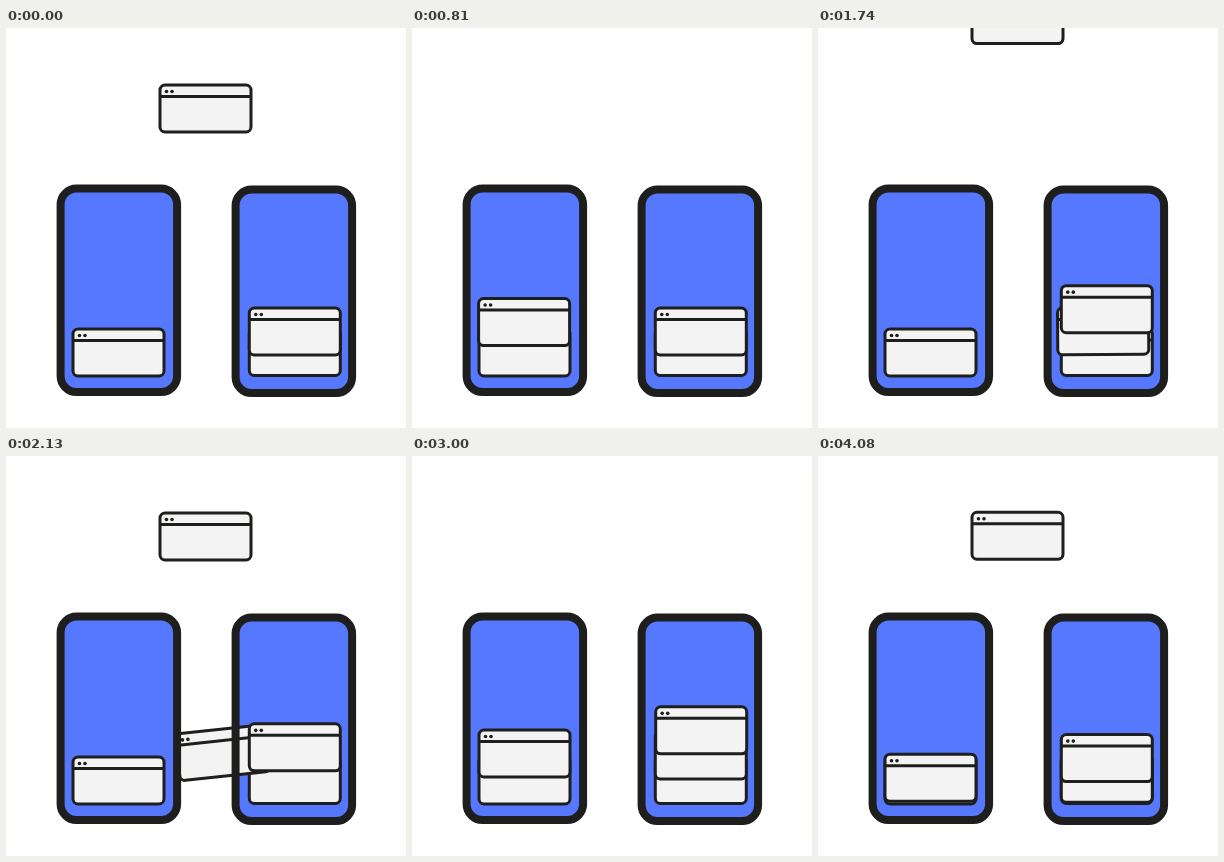
An HTML page with a canvas for the animation above (4.11 s loop, 400 by 400 pixels).

```html
<!DOCTYPE html>
<html lang="en">
<head>
<meta charset="utf-8">
<title>Window exchange</title>
<style>
  html, body { margin: 0; width: 100%; height: 100%; overflow: hidden; background: #fff; }
  canvas { display: block; width: 400px; height: 400px; }
</style>
</head>
<body>
<canvas id="stage" width="400" height="400"></canvas>
<script>
const ctx = document.getElementById('stage').getContext('2d');
const LOOP = 4110;
const INK = '#1e1e1c', PAPER = '#f3f3f3', BLUE = '#5578ff';
const WIN_W = 91, WIN_H = 47;
const TOP = { x: 154, y: 57 };
const LEFT_X = 67, RIGHT_X = 243.3;
const LEFT_BASE = 301, RIGHT_BASE = 300.5, RIGHT_SECOND = 280;

const lerp = (a, b, p) => a + (b - a) * p;
const progress = (t, start, end) => Math.min(1, Math.max(0, (t - start) / (end - start)));
const bezier = (s, a, b) => 3 * s * (1 - s) ** 2 * a + 3 * s * s * (1 - s) * b + s ** 3;
const easeInOut = p => (1 - Math.cos(Math.PI * p)) / 2;
const easeOut = p => 1 - (1 - p) ** 2;

// Fast start with a long, soft landing.
function glide(p) {
  let lo = 0, hi = 1;
  for (let i = 0; i < 24; i++) {
    const mid = (lo + hi) / 2;
    if (bezier(mid, 0.3, 0.25) < p) lo = mid; else hi = mid;
  }
  return bezier(lo, 0, 1);
}

function roundRect(x, y, w, h, r) {
  ctx.beginPath();
  ctx.roundRect(x, y, w, h, r);
}

function drawWindow({ x, y, tilt = 0 }) {
  ctx.save();
  ctx.translate(x + WIN_W / 2, y + WIN_H / 2);
  ctx.rotate(tilt * Math.PI / 180);
  ctx.translate(-WIN_W / 2, -WIN_H / 2);
  ctx.lineWidth = 3;
  ctx.strokeStyle = INK;
  ctx.fillStyle = PAPER;
  roundRect(0, 0, WIN_W, WIN_H, 5);
  ctx.fill();
  ctx.stroke();
  ctx.beginPath();
  ctx.moveTo(0, 11.5);
  ctx.lineTo(WIN_W, 11.5);
  ctx.stroke();
  ctx.fillStyle = INK;
  for (const dotX of [6.5, 12]) {
    ctx.beginPath();
    ctx.arc(dotX, 6.5, 1.8, 0, Math.PI * 2);
    ctx.fill();
  }
  ctx.restore();
}

function phonePath(x, y) {
  roundRect(x, y, 116.5, 203.5, 16);
}

function eachPhone(paint) {
  for (const [x, y] of [[54.6, 160.6], [229.6, 161.6]]) {
    phonePath(x, y);
    paint();
  }
}

function enter(t, start) {
  return { x: TOP.x, y: lerp(-51, TOP.y, easeInOut(progress(t, start, start + 540))) };
}

function fall(t, start, x, y) {
  const p = glide(progress(t, start, start + 960));
  return { x: lerp(TOP.x, x, bezier(p, 0.8, 1.1)), y: lerp(TOP.y, y, p) };
}

function slide(p, from, to, lift, tilt) {
  const arc = Math.sin(Math.PI * p);
  return {
    x: lerp(from.x, to.x, p),
    y: lerp(from.y, to.y, p) - lift * arc,
    tilt: tilt * arc
  };
}

// Drops into the left phone, crosses over and lands on the right stack.
function firstWindow(t, sink) {
  if (t < 1050) return fall(t, 0, LEFT_X, 274);
  if (t < 1630) {
    return slide(progress(t, 1050, 1630), { x: LEFT_X, y: 274 }, { x: RIGHT_X, y: 254 }, 4, 5.7);
  }
  const settled = lerp(254, 276, easeOut(progress(t, 1630, 2910)));
  return { x: RIGHT_X, y: lerp(settled, RIGHT_BASE, sink) };
}

// Leaves the right stack and returns to the left phone.
function returningWindow(t, sink) {
  const pose = slide(progress(t, 1720, 2730),
    { x: RIGHT_X, y: RIGHT_SECOND }, { x: LEFT_X, y: 274 }, 4.6, -6.4);
  pose.y = lerp(pose.y, LEFT_BASE, sink * sink);
  return pose;
}

function secondWindow(t, sink) {
  if (t < 2190) return enter(t, 1590);
  const pose = fall(t, 2190, RIGHT_X, 254);
  pose.y = lerp(pose.y, RIGHT_SECOND, sink);
  return pose;
}

function draw(t) {
  const sink = progress(t, 3570, LOOP);
  ctx.fillStyle = '#fff';
  ctx.fillRect(0, 0, 400, 400);

  ctx.fillStyle = BLUE;
  eachPhone(() => ctx.fill());

  drawWindow({ x: LEFT_X, y: LEFT_BASE });
  drawWindow({ x: RIGHT_X, y: RIGHT_BASE });
  drawWindow(returningWindow(t, sink));
  drawWindow(firstWindow(t, sink));
  drawWindow(secondWindow(t, sink));
  drawWindow(enter(t, 3570));

  ctx.strokeStyle = INK;
  ctx.lineWidth = 8;
  eachPhone(() => ctx.stroke());
}

const startTime = performance.now();
function tick() {
  draw((performance.now() - startTime) % LOOP);
  requestAnimationFrame(tick);
}
tick();
</script>
</body>
</html>
```
